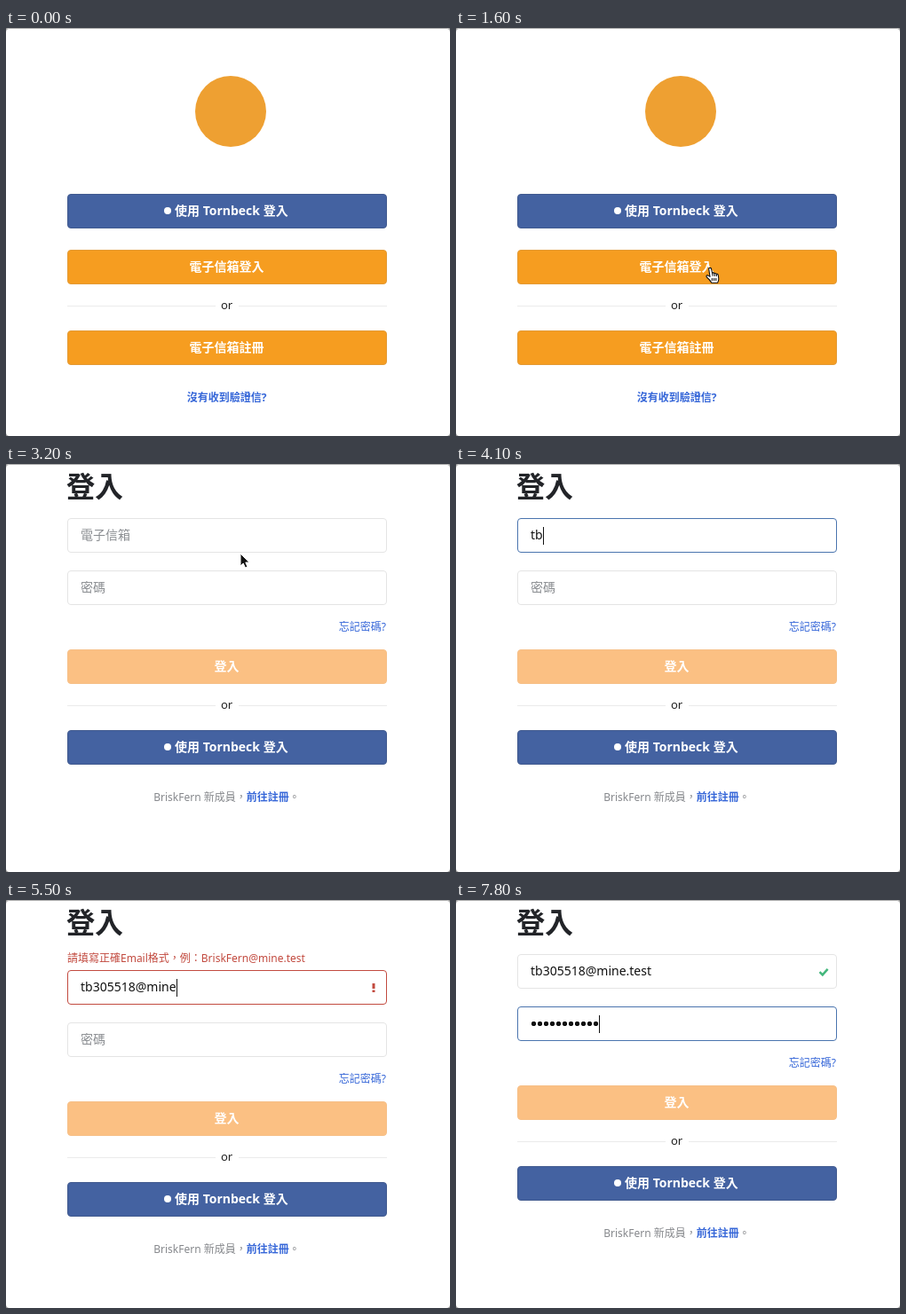
An HTML page that plays this animation: 500x460 px, repeating every 8000 ms.

```html
<!DOCTYPE html>
<html lang="zh-Hant">
<head>
<meta charset="utf-8">
<title>登入</title>
<style>
  html, body { margin: 0; width: 100%; height: 100%; overflow: hidden; background: #8c8c8c; }
  #stage {
    position: relative; width: 500px; height: 460px; overflow: hidden;
    background: #fff; border-radius: 4px; box-shadow: inset 0 1px #b0b0b0;
    font: 14px "Noto Sans", "Noto Sans CJK TC", "Noto Sans CJK", sans-serif; color: #222;
  }
  #stage * { box-sizing: border-box; }
  .page, #body { position: absolute; left: 0; top: 0; width: 500px; height: 460px; }
  .page > *, #body > * { position: absolute; white-space: nowrap; }

  .btn {
    left: 69px; width: 360px; height: 39px; border: 1px solid #e39a35; border-radius: 4px;
    background: #f69d20; color: #fff; font-weight: 600; line-height: 36px;
    text-align: center; padding-right: 1px;
  }
  .off { background: #fbc083; border-color: #f6bf87; }
  .social { background: #4462a1; border-color: #415a8f; text-align: left; padding-left: 120px; }
  .social::before {
    content: ""; position: absolute; left: 108px; top: 14px;
    width: 8px; height: 8px; border-radius: 50%; background: #fff;
  }
  .or {
    left: 69px; width: 360px; height: 20px; line-height: 19px;
    font-size: 13px; text-align: center; padding-right: 1px;
  }
  .or::before, .or::after {
    content: ""; position: absolute; top: 10px; width: 167px; height: 1px; background: #ebebeb;
  }
  .or::before { left: 0; }
  .or::after { right: 0; }
  .small {
    left: 69px; width: 360px; height: 20px; line-height: 20px;
    font-size: 12px; text-align: center; padding-right: 1px;
  }
  .link, .small b { color: #3566d8; }
  .link { font-weight: 500; }
  .small b { font-weight: 600; }
  .logo { left: 213px; top: 54px; width: 80px; height: 80px; border-radius: 50%; background: #eea032; }
  h1 { left: 68px; top: 5px; margin: 0; font-size: 32px; line-height: 40px; font-weight: 600; color: #222428; }
  #error { left: 69px; top: 56px; font-size: 12px; line-height: 20px; color: #c24a3f; }

  .field {
    left: 69px; width: 360px; height: 39px; padding-left: 14px;
    border: 1px solid #e4e4e4; border-radius: 4px; line-height: 36px; color: #111;
  }
  .hint { color: #8a8d91; }
  .field > * { position: absolute; }
  .field svg { right: 8px; top: 13px; }
  .caret { top: 9px; width: 1px; height: 20px; background: #111; }
  #typed { left: 14px; }
  #dots {
    left: 14px; top: 15px; height: 7px;
    background: radial-gradient(circle at 3.5px 3.5px, #111 2.4px, transparent 3px) 0 0 / 7px 7px;
  }
  #cursor { position: absolute; left: 0; top: 0; overflow: visible; }
  #cursor path { stroke-linejoin: round; }
</style>
</head>
<body>
<div id="stage">
  <div class="page" id="menu">
    <div class="logo"></div>
    <div class="btn social" style="top:187px">使用 Tornbeck 登入</div>
    <div class="btn" style="top:250px">電子信箱登入</div>
    <div class="or" style="top:303px">or</div>
    <div class="btn" style="top:341px">電子信箱註冊</div>
    <div class="small" style="top:407px"><b>沒有收到驗證信?</b></div>
  </div>

  <div class="page" id="login">
    <h1>登入</h1>
    <div id="error">請填寫正確Email格式，例：BriskFern@mine.test</div>
    <div id="body">
      <div class="field" id="email" style="top:61px">
        <span class="hint">電子信箱</span>
        <span id="typed"></span><i class="caret"></i>
        <svg id="warn" width="12" height="12"><path d="M6 1V7M6 8.4V11" stroke="#c24a3f" stroke-width="3"/></svg>
        <svg id="tick" width="12" height="12"><path d="M1.5 6.2L4.8 9.4L10.6 2.8" fill="none" stroke="#43b77c" stroke-width="2.5"/></svg>
      </div>
      <div class="field" id="pass" style="top:120px">
        <span class="hint">密碼</span>
        <span id="dots"></span><i class="caret"></i>
      </div>
      <div class="small link" style="top:174px;text-align:right">忘記密碼?</div>
      <div class="btn off" style="top:209px">登入</div>
      <div class="or" style="top:262px">or</div>
      <div class="btn social" style="top:300px">使用 Tornbeck 登入</div>
      <div class="small" style="top:366px;color:#86888c">BriskFern 新成員，<b>前往註冊</b>。</div>
    </div>
  </div>

  <svg id="cursor" width="1" height="1">
    <path id="arrow" d="M0 0V14L3.2 11L5.5 16L8 15L5.8 10H10Z" fill="#111" stroke="#fff"/>
    <path id="hand" d="M-1.4 0Q0-1.4 1.4 0L2.6 5.4Q4 4.2 4.9 5.8Q6.4 4.8 7.2 6.6Q9 5.8 9.4 8L9.8 12Q9.8 14 8.6 16.2H1.8Q0 13-3.6 10Q-4.8 8-2.8 7.6L0 9.4ZM2.6 5.4L3.2 8.6M4.9 5.8L5.4 8.8M7.2 6.6L7.5 9M2.4 11V14M4.6 11V14M6.8 11V14"
      fill="#fff" stroke="#111" stroke-width="1.1"/>
    <path id="beam" d="M-3-8Q0-8 0-6Q0-8 3-8M0-6V6M-3 8Q0 8 0 6Q0 8 3 8" fill="none" stroke="#222"/>
  </svg>
</div>

<script>
const LOOP = 8000, STEP = 100;
const OPEN = 1800, FOCUS = 3400, ERROR = 4300, VALID = 6200;
const ADDRESS = "tb305518@mine.test";
const emailKeys = [3700, 3800, 4300, 4400, 4500, 4600, 4700, 4800, 5000, 5100,
                   5300, 5400, 5500, 5600, 5700, 5800, 5900, 6000];
const passKeys = [6300, 6400, 6500, 6600, 6700, 6800, 7000, 7400, 7500, 7600, 7700];
// time, x, y of the pointer
const route = [[500, 412, 332], [1300, 286, 271], [1700, 286, 271],
               [2000, 282, 271], [2800, 282, 271], [3300, 262, 81]];
const GREY = [228, 228, 228], BLUE = [74, 116, 174], RED = [194, 74, 63];

const $ = id => document.getElementById(id);
const show = (el, on) => { el.style.display = on ? "" : "none"; };
const pressed = (keys, t) => keys.filter(k => k <= t).length;
const progress = (t, from, to) => Math.min(1, Math.max(0, (t - from) / (to - from)));
const ease = p => p * p * (3 - 2 * p);
const mix = (a, b, p) => `rgb(${a.map((v, i) => Math.round(v + (b[i] - v) * p))})`;
const part = (id, selector) => $(id).querySelector(selector);

function pointer(t) {
  let i = route.findIndex(([time]) => time > t);
  if (i < 0) return route[route.length - 1].slice(1);
  i = Math.max(i, 1);
  const [t0, x0, y0] = route[i - 1], [t1, x1, y1] = route[i];
  const p = ease(progress(t, t0, t1));
  return [x0 + (x1 - x0) * p, y0 + (y1 - y0) * p];
}

function drawCursor(t) {
  const [x, y] = pointer(t);
  const onMenu = t < OPEN;
  const hand = onMenu && y >= 250 && y < 289;
  const beam = !onMenu && (y < 100 || y > 120 && y < 159);
  show($("cursor"), t >= 500 && t < emailKeys[0]);
  show($("hand"), hand);
  show($("beam"), beam);
  show($("arrow"), !hand && !beam);
  $("cursor").style.transform = `translate(${Math.round(x)}px, ${Math.round(y)}px)`;
}

function drawEmail(t) {
  const count = pressed(emailKeys, t), bad = t >= ERROR && t < VALID;
  const caret = part("email", ".caret");
  $("typed").textContent = ADDRESS.slice(0, count);
  show(part("email", ".hint"), !count);
  show(caret, t >= FOCUS && t < VALID);
  caret.style.left = 14 + $("typed").offsetWidth + "px";
  show($("warn"), bad);
  show($("tick"), t >= VALID);
  show($("error"), bad);
  $("body").style.top = bad ? "18px" : "0";
  $("email").style.borderColor =
    t < ERROR ? mix(GREY, BLUE, progress(t, FOCUS - STEP, FOCUS + STEP)) :
    bad ? mix(BLUE, RED, progress(t, ERROR - STEP, ERROR + STEP)) :
    mix(RED, GREY, progress(t, VALID - STEP, VALID + 400));
}

function drawPassword(t) {
  const width = 7 * pressed(passKeys, t);
  const caret = part("pass", ".caret");
  $("dots").style.width = width + "px";
  show(part("pass", ".hint"), !width);
  show(caret, t >= VALID);
  caret.style.left = 14 + width + "px";
  $("pass").style.borderColor = mix(GREY, BLUE, progress(t, VALID - STEP, VALID + STEP));
}

const start = performance.now();
function frame() {
  const t = Math.floor((performance.now() - start) % LOOP / STEP) * STEP;
  show($("menu"), t < OPEN);
  show($("login"), t >= OPEN);
  drawEmail(t);
  drawPassword(t);
  drawCursor(t);
  requestAnimationFrame(frame);
}
frame();
</script>
</body>
</html>
```
